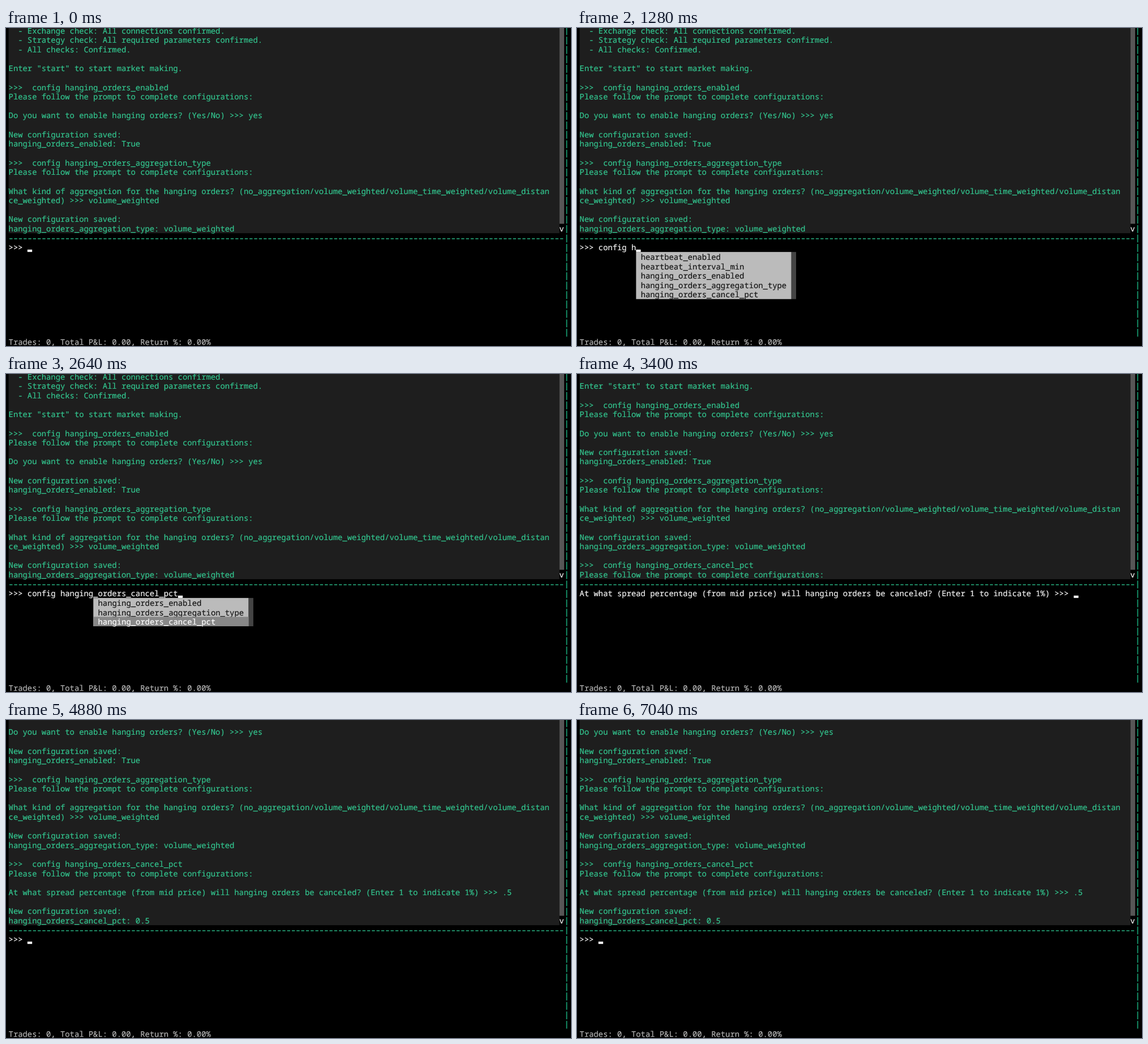
An HTML page that plays this animation: 998 px wide and 561 px high, repeating every 7080 ms.

```html
<!DOCTYPE html>
<html lang="en">
<head>
<meta charset="utf-8">
<title>Terminal session</title>
<style>
  html, body { margin: 0; width: 100%; height: 100%; overflow: hidden; background: #000; }
  svg { display: block; width: 100vw; height: 100vh; }
  text {
    font: 13.855px "Noto Sans Mono", "DejaVu Sans Mono", monospace;
    font-variant-ligatures: none;
    text-rendering: geometricPrecision;
    white-space: pre;
    stroke-width: 0.2px;
  }
</style>
</head>
<body>
<svg id="stage" viewBox="0 0 998 561">
  <rect width="998" height="561" fill="#000"/>
  <rect x="4.6" width="973" height="362" fill="#1e1e1e"/>
  <rect x="977.6" width="8.3" height="345.4" fill="#565656"/>
  <g id="output"></g>
  <path id="divider" fill="none" stroke="#27b080" stroke-width="1.5"/>
  <path id="border" fill="none" stroke="#17996e" stroke-width="1.8"/>
  <g id="input"></g>
  <g id="menu"></g>
  <g id="fixed"></g>
</svg>
<script>
const LOOP = 7080;
const CELL_W = 8.313, CELL_H = 16.63;
const VISIBLE_ROWS = 22, PROMPT_ROW = 23;
const GREEN = '#33c68f', WHITE = '#f6f6f6', GRAY = '#b4b4b4';
const colX = col => 4.6 + col * CELL_W;
const rowY = row => -4 + row * CELL_H;
const el = id => document.getElementById(id);

const QUESTION = 'At what spread percentage (from mid price) will hanging orders be canceled? (Enter 1 to indicate 1%) >>> ';
const FOLLOW = 'Please follow the prompt to complete configurations:';
const SAVED = 'New configuration saved:';

const LOG = [
  '  - Exchange check: All connections confirmed.',
  '  - Strategy check: All required parameters confirmed.',
  '  - All checks: Confirmed.',
  '',
  'Enter "start" to start market making.',
  '',
  '>>>  config hanging_orders_enabled',
  FOLLOW,
  '',
  'Do you want to enable hanging orders? (Yes/No) >>> yes',
  '',
  SAVED,
  'hanging_orders_enabled: True',
  '',
  '>>>  config hanging_orders_aggregation_type',
  FOLLOW,
  '',
  'What kind of aggregation for the hanging orders? (no_aggregation/volume_weighted/volume_time_weighted/volume_distan',
  'ce_weighted) >>> volume_weighted',
  '',
  SAVED,
  'hanging_orders_aggregation_type: volume_weighted',
  '',
  '>>>  config hanging_orders_cancel_pct',
  FOLLOW,
  '',
  QUESTION + '.5',
  '',
  SAVED,
  'hanging_orders_cancel_pct: 0.5'
];

const KEYS = [
  'heartbeat_enabled',
  'heartbeat_interval_min',
  'hanging_orders_enabled',
  'hanging_orders_aggregation_type',
  'hanging_orders_cancel_pct'
];

// Key press times in ms
const COMMAND = 'config hanging';
const COMMAND_TIMES = [200, 280, 360, 440, 520, 640, 1080, 1200, 1320, 1440, 1600, 1720, 1840, 2000];
const SELECT_TIMES = [2200, 2320, 2440];
const SUBMIT_COMMAND = 2720;
const ANSWER = '.5';
const ANSWER_TIMES = [3720, 3840];
const SUBMIT_ANSWER = 4200;

const presses = (times, t) => times.filter(time => time <= t).length;

function stateAt(t) {
  if (t >= SUBMIT_ANSWER) return { scroll: 8, line: '>>> ', matches: [] };
  if (t >= SUBMIT_COMMAND) {
    return { scroll: 3, line: QUESTION + ANSWER.slice(0, presses(ANSWER_TIMES, t)), matches: [] };
  }
  const typed = COMMAND.slice(0, presses(COMMAND_TIMES, t));
  const prefix = typed.slice('config '.length);
  const matches = prefix ? KEYS.filter(key => key.startsWith(prefix)) : [];
  const selected = presses(SELECT_TIMES, t) - 1;
  const command = selected >= 0 ? 'config ' + matches[selected] : typed;
  return { scroll: 0, line: '>>> ' + command, matches, selected, menuCol: 4 + typed.length };
}

const escapeText = s => s.replace(/&/g, '&amp;').replace(/</g, '&lt;').replace(/>/g, '&gt;');

function textAt(col, row, content, color) {
  return `<text x="${colX(col)}" y="${rowY(row) + 13.8}" fill="${color}" stroke="${color}">${escapeText(content)}</text>`;
}

function box(x, y, w, h, fill) {
  return `<rect x="${x}" y="${y}" width="${w}" height="${h}" fill="${fill}"/>`;
}

function menuMarkup({ matches, selected, menuCol }) {
  if (!matches.length) return '';
  const x = colX(menuCol), y = rowY(PROMPT_ROW + 1);
  const width = (Math.max(...matches.map(key => key.length)) + 2) * CELL_W;
  const height = matches.length * CELL_H;
  let markup = box(x, y, width, height, '#bbbbbb') + box(x + width, y, CELL_W, height, '#444444');
  matches.forEach((key, i) => {
    const active = i === selected;
    if (active) markup += box(x, y + i * CELL_H, width, CELL_H, '#888888');
    markup += textAt(menuCol + 1, PROMPT_ROW + 1 + i, key, active ? '#ffffff' : '#151515');
  });
  return markup;
}

function drawFixed() {
  let dashes = '', bars = '';
  for (let col = 0; col < 118; col++) dashes += `M${colX(col) + 1.5} 371.8h5.4`;
  for (let row = 0; row < 33; row++) bars += `M990.4 ${rowY(row) + 2.6}v13.8`;
  el('divider').setAttribute('d', dashes);
  el('border').setAttribute('d', bars);
  el('fixed').innerHTML = textAt(117, 21, 'v', WHITE) +
    textAt(0, 33, 'Trades: 0, Total P&L: 0.00, Return %: 0.00%', GRAY);
}

let shown = '';

function render(t) {
  const state = stateAt(t);
  const key = JSON.stringify(state);
  if (key === shown) return;
  shown = key;
  el('output').innerHTML = LOG.slice(state.scroll, state.scroll + VISIBLE_ROWS)
    .map((line, row) => textAt(0, row, line, GREEN)).join('');
  el('input').innerHTML = textAt(0, PROMPT_ROW, state.line, WHITE) +
    box(colX(state.line.length), 390.9, CELL_W, 4.2, WHITE);
  el('menu').innerHTML = menuMarkup(state);
}

const start = performance.now();

function tick() {
  render((performance.now() - start) % LOOP);
  requestAnimationFrame(tick);
}

drawFixed();
tick();
</script>
</body>
</html>
```
